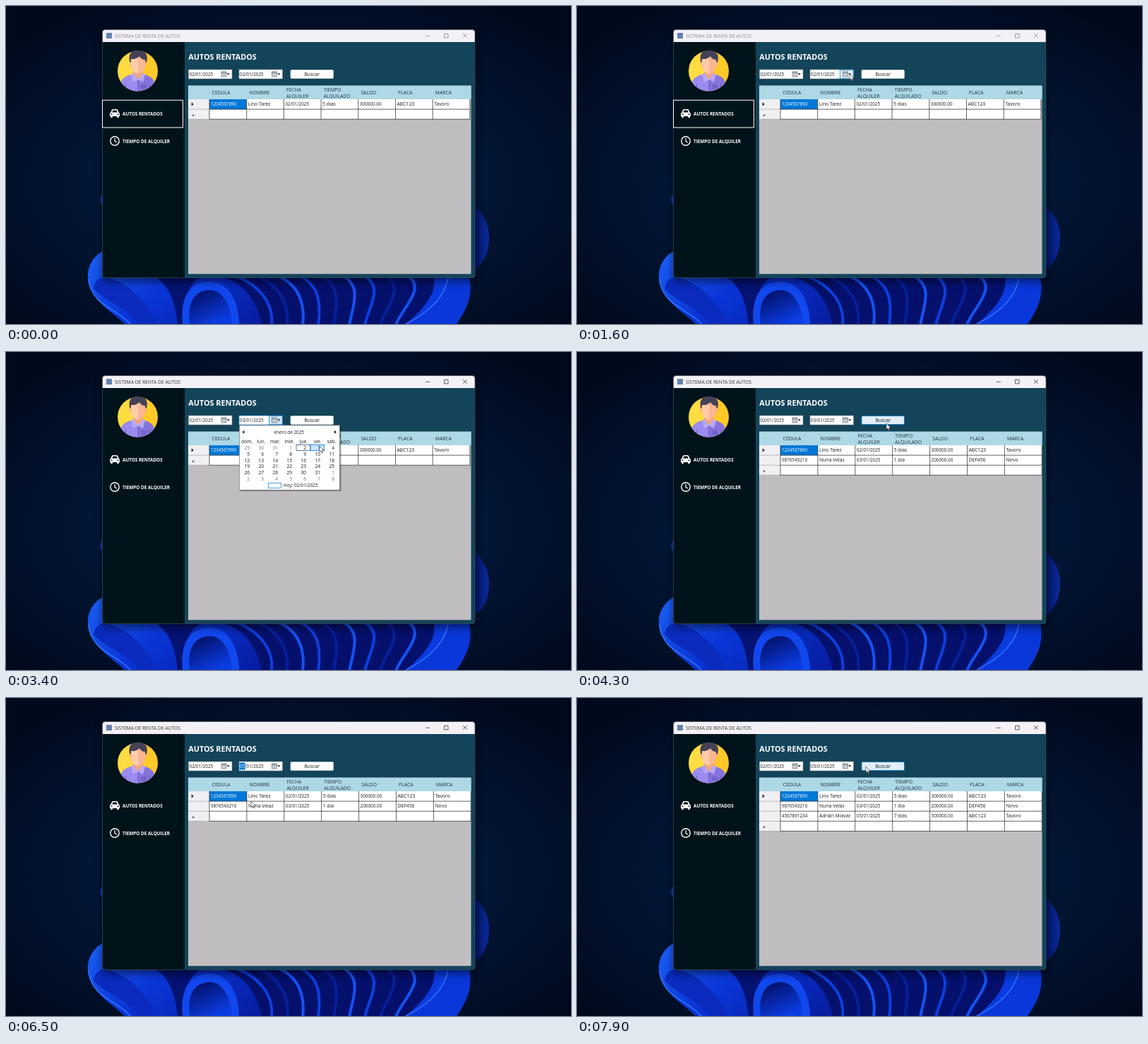
These frames come from a looping animation (800x450 px, 8000 ms). An HTML page:

```html
<!DOCTYPE html>
<html lang="es">
<head>
<meta charset="utf-8">
<title>Sistema de renta de autos</title>
<style>
html, body { margin: 0; width: 100%; height: 100%; overflow: hidden; background: #010a1f; }
svg { display: block; width: 100vw; height: 100vh; }
text { font: 6.8px "Open Sans", "Noto Sans", sans-serif; fill: #1c1c1c; white-space: pre; }
.num { font-size: 6.35px; }
.head { fill: #23333b; }
.title { font-size: 6.7px; fill: #333; }
.h1 { font-size: 10.8px; font-weight: 700; fill: #fff; }
.menu { font-size: 6.35px; font-weight: 700; fill: #fff; }
.mid { text-anchor: middle; }
.end { text-anchor: end; }
.dim { fill: #777; }
.light { fill: #fff; }
.controls { fill: none; stroke: #333; stroke-width: .8; }
.inactive .title { fill: #8b8a90; }
.inactive .controls { stroke: #8b8a90; }
.focusBox, .hot { visibility: hidden; }
.inactive .focusBox, .on { visibility: visible; }
</style>
</head>
<body>
<svg viewBox="0 0 800 450" preserveAspectRatio="none">
  <defs>
    <radialGradient id="night" cx=".5" cy=".55" r=".65">
      <stop offset="0" stop-color="#052455"/><stop offset=".55" stop-color="#021534"/><stop offset="1" stop-color="#010a1d"/>
    </radialGradient>
    <linearGradient id="petal" x2="1" y2=".25">
      <stop offset="0" stop-color="#1b62f8"/><stop offset=".3" stop-color="#0a35d6"/>
      <stop offset=".65" stop-color="#061da0"/><stop offset="1" stop-color="#0a3be0"/>
    </linearGradient>
    <linearGradient id="fold" x2=".6" y2="1">
      <stop offset="0" stop-color="#020b58"/><stop offset="1" stop-color="#0b3ce2"/>
    </linearGradient>
    <linearGradient id="side" x2="1">
      <stop offset="0" stop-color="#04115a"/><stop offset="1" stop-color="#0a2a9c"/>
    </linearGradient>
    <filter id="soft" x="-10%" y="-10%" width="120%" height="120%"><feGaussianBlur stdDeviation="6"/></filter>
    <clipPath id="disc"><circle cx="186.500" cy="92" r="28.500"/></clipPath>
    <clipPath id="frame"><rect x="136.500" y="33.500" width="527.500" height="351" rx="4"/></clipPath>
  </defs>

  <rect width="800" height="450" fill="url(#night)"/>
  <g id="bloom">
    <path d="M140 264C131 268 131 279 140 287Z" fill="#0d3aa8"/>
    <path d="M660 280C680 295 687 318 683 340C680 358 672 368 660 375Z" fill="url(#side)"/>
    <path d="M140 345C118 356 112 378 118 396C128 422 152 434 168 450H638C650 432 662 412 655 384L640 374Z" fill="url(#petal)"/>
    <path d="M140 384C160 386 196 408 212 450H186C176 428 142 420 124 400C126 388 132 384 140 384Z" fill="#0a2bbd"/>
    <path d="M212 384C234 398 240 424 243 450H262C254 420 252 398 276 384Z" fill="#041272"/>
    <path d="M250 450C246 410 262 390 288 390C318 390 330 424 330 450Z" fill="#1148ee"/>
    <path d="M260 450C256 418 268 402 289 402C309 402 319 428 320 450Z" fill="url(#fold)"/>
    <path d="M308 384C340 394 356 420 362 450H566C590 430 610 408 606 384Z" fill="#04106c"/>
    <g id="folds" fill="none" stroke-width="4"></g>
    <path d="M566 450C600 434 622 410 626 384H656C662 412 650 432 638 450Z" fill="#0a37d9"/>
    <path d="M117 386C120 424 158 428 176 450M566 450C602 432 622 410 626 384" fill="none" stroke="#3277ff" stroke-width="1.500"/>
  </g>

  <rect x="136" y="36" width="529" height="354" rx="5" opacity=".5" filter="url(#soft)"/>
  <g id="window" class="inactive">
    <g clip-path="url(#frame)">
      <rect x="136" y="33" width="529" height="352" fill="#134459"/>
      <rect x="136" y="51" width="117" height="334" fill="#00131b"/>
      <rect x="136" y="33" width="529" height="18" fill="#f3f1f6"/>
    </g>
    <rect x="136.500" y="33.500" width="527.500" height="351" rx="4" fill="none" stroke="#45515a" stroke-width=".6"/>
    <rect x="142" y="38" width="8" height="8" fill="#6482ad"/>
    <text class="title" x="154" y="44.600">SISTEMA DE RENTA DE AUTOS</text>
    <path class="controls" d="M594 42.200H600M620.500 39.300H626V44.800H620.500ZM647 39L652.800 44.800M652.800 39L647 44.800"/>

    <g clip-path="url(#disc)">
      <path d="M158 63H187V121H158Z" fill="#ffdc42"/>
      <path d="M186.500 63H216V121H186.500Z" fill="#ffc928"/>
      <path d="M162 122C161 104 166 100 178 97H196C207 100 212 104 211 122Z" fill="#8674dc"/>
      <path d="M162 122C161 104 166 100 178 97L186.500 104V122Z" fill="#9b8aef"/>
      <path d="M180 88H194V98L187 105L180 98Z" fill="#f2a481"/>
      <path d="M177 97L180 95L187 104L194 95L197 97L194 108L187 104L180 108Z" fill="#b5a8f7"/>
      <path d="M169.500 110V122M203.500 110V122M187 105V122" stroke="#6758b8" stroke-width=".8"/>
      <path d="M191 111H199V117H191Z" fill="#7463c8"/>
    </g>
    <path d="M176 82C171 66 180 62 188 63C200 63 202 72 198 83Z" fill="#454258"/>
    <path d="M177 75C182 76 186 74 189 71C191 75 194 76 197 76V84C197 91 191 96 187 96C183 96 177 91 177 84Z" fill="#f9b792"/>
    <path d="M177 75C181 76 185 74.500 187 73V96C183 96 177 91 177 84Z" fill="#ffcca9"/>
    <path d="M177 79C174 78 174 85 177.500 85ZM197 79C200 78 200 85 196.500 85Z" fill="#f5ad88"/>

    <rect class="focusBox" x="136.500" y="133.300" width="114" height="38.700" fill="none" stroke="#fff"/>
    <path d="M147 152L148.300 150.700L150 146.800Q150.500 146 151.500 146H156.500Q157.500 146 158 146.800L159.700 150.700L161 152V156H159.800V158H157.200V156H150.800V158H148.200V156H147Z" fill="#fff"/>
    <path d="M150.300 150.500L151.500 147.500H156.500L157.700 150.500ZM148.500 152.500H150.500V154H148.500ZM157.500 152.500H159.500V154H157.500Z" fill="#00131b"/>
    <circle cx="154" cy="191" r="6.200" fill="none" stroke="#fff" stroke-width="1.400"/>
    <path d="M154 187V191.300L156.800 193" fill="none" stroke="#fff" stroke-width="1.200"/>
    <text class="menu" x="165" y="155.400">AUTOS RENTADOS</text>
    <text class="menu" x="165" y="194.400">TIEMPO DE ALQUILER</text>
    <text class="h1" x="258.300" y="76.200">AUTOS RENTADOS</text>

    <g id="pickers"></g>
    <rect id="button" x="403" y="90.500" width="60.500" height="12" rx="1.500" stroke-width=".8"/>
    <text class="mid" x="433.200" y="98.900">Buscar</text>

    <rect x="258" y="112.700" width="400.500" height="266.500" fill="#bfbdbf"/>
    <g id="grid"></g>
    <g id="calendar" class="hot"></g>
  </g>
  <path id="cursor" d="M0 0V8.600L2 6.800L3.500 10L4.900 9.400L3.500 6.300H6.200Z" fill="#fff" stroke="#222" stroke-width=".6"/>
</svg>

<script>
const LOOP = 8000;
const $ = id => document.getElementById(id);
const rect = (x, y, w, h, fill, extra = '') =>
  `<rect x="${x}" y="${y}" width="${w}" height="${h}" fill="${fill}" ${extra}/>`;
const text = (x, y, s, cls = '') => `<text x="${x}" y="${y}" class="${cls}">${s}</text>`;
const line = (x1, y1, x2, y2, color, width = .7) =>
  `<path d="M${x1} ${y1}L${x2} ${y2}" stroke="${color}" stroke-width="${width}"/>`;

const COLUMNS = ['CEDULA', 'NOMBRE', 'FECHA ALQUILER', 'TIEMPO ALQUILADO', 'SALDO', 'PLACA', 'MARCA'];
const RENTALS = [
  ['1234567890', 'Lino Tarez', '02/01/2025', '5 días', '300000.00', 'ABC123', 'Tavoro'],
  ['9876543210', 'Nuria Velaz', '03/01/2025', '1 día', '200000.00', 'DEF456', 'Nirvo'],
  ['4567891234', 'Adrián Molvar', '05/01/2025', '7 días', '500000.00', 'ABC123', 'Tavoro']
];

// Pointer stops: time, x, y
const PATH = [
  [900, 600, 450], [1500, 386, 96], [1950, 386, 96], [2800, 441, 134], [3400, 444, 133],
  [3950, 438, 99], [4300, 438, 101], [4900, 386, 97], [5100, 386, 97], [5400, 397, 126],
  [6050, 345, 145], [6500, 347, 146], [7300, 412, 97], [7900, 409, 97]
];

function drawFolds() {
  let out = '';
  for (let i = 0; i < 9; i++) {
    const x = 318 + i * 31;
    const end = 376 + i * 22;
    const color = ['#0c3fe0', '#071f9c', '#1552f2'][i % 3];
    out += `<path d="M${x} 380C${x + 34} ${390 + i} ${end + 4} ${416 + i * 2} ${end} 452" stroke="${color}"/>`;
  }
  $('folds').innerHTML = out;
}

function picker(x, date, { hover, open, selected }) {
  let out = rect(x, 90, 61.5, 13, '#fff', `stroke="${open ? '#0078d7' : '#8a8a8a'}" stroke-width=".6"`);
  if (hover || open) {
    out += rect(x + 42.5, 90.3, 18.7, 12.4, open ? '#cce4f7' : '#e5f1fb', 'stroke="#0078d7" stroke-width=".7"');
  }
  if (selected) {
    out += rect(x + .6, 91.5, 8, 10, '#0078d7');
    out += `<text class="num" x="${x + 1}" y="98.800"><tspan class="light">${date.slice(0, 2)}</tspan>${date.slice(2)}</text>`;
  } else {
    out += text(x + 1, 98.8, date, 'num');
  }
  out += rect(x + 46.5, 92.8, 7, 7.2, '#d9dde2', 'stroke="#66707a" stroke-width=".7"');
  out += line(x + 46.5, 94.6, x + 53.5, 94.6, '#66707a', 1);
  for (const y of [96.5, 98.3]) out += line(x + 47.5, y, x + 52.5, y, '#8e98a2', .5);
  return out + `<path d="M${x + 54.3} 95.300h4l-2 2.400z" fill="#222"/>`;
}

function grid(count) {
  const step = count > 1 ? 52.9 : 52.7;
  const rowH = 14.1, top = 132, left = 288;
  const right = left + step * 7, bottom = top + rowH * (count + 1);
  let out = rect(258, 112.7, 400.5, 19.3, '#add8e6');
  out += rect(258, top, 30, bottom - top, '#f0eff1');
  out += rect(left, top, right - left, bottom - top, '#fff');
  out += rect(left, top, step, rowH, '#0078d7');
  COLUMNS.forEach((name, i) => {
    const x = left + 3.6 + i * step;
    const words = name.split(' ');
    if (words.length > 1) words.forEach((w, k) => out += text(x, 120.8 + k * 8.7, w, 'head'));
    else out += text(x, 125.2, name, 'head');
  });
  for (let r = 0; r < count; r++) {
    RENTALS[r].forEach((value, i) => {
      const cls = (/^\d/.test(value) && !value.includes('d') ? 'num ' : '') + (r + i ? '' : 'light');
      out += text(left + 2 + i * step, top + 9.2 + r * rowH, value, cls);
    });
  }
  for (let r = 1; r <= count + 1; r++) {
    const y = top + r * rowH;
    out += line(258, y, left, y, '#a5a3a6') + line(left, y, right, y, '#202020');
  }
  for (let i = 0; i <= 7; i++) out += line(left + i * step, top, left + i * step, bottom, '#202020');
  out += '<path d="M262.700 136.200L265.700 138.900L262.700 141.600Z" fill="#222"/>';
  return out + text(263.3, bottom - 2.7, '*');
}

function calendar(day) {
  const colX = i => 341 + i * 20;
  let out = rect(332, 106, 142.5, 91, '#000', 'opacity=".35"');
  out += rect(330.5, 103.8, 142, 91.4, '#fff', 'stroke="#777" stroke-width=".7"');
  out += text(400.7, 115.8, 'enero de 2025', 'num mid');
  out += '<path d="M337.500 110.800v5l-3-2.500zM465 110.800v5l3-2.500z" fill="#222"/>';
  ['dom.', 'lun.', 'mar.', 'mié.', 'jue.', 'vie.', 'sáb.'].forEach((name, i) =>
    out += text(colX(i) + .3, 128.8, name, 'mid'));
  out += line(334, 130.4, 469, 130.4, '#ddd', .5);
  const box = d => {
    const cell = d + 2, x = 331 + cell % 7 * 20, y = 131.3 + Math.floor(cell / 7) * 8.8;
    return [x, y, 19.8, 8.3];
  };
  out += rect(...box(day), '#cce8ff', 'stroke="#0078d7" stroke-width=".8"');
  out += rect(...box(2), 'none', 'stroke="#3b5f80" stroke-width=".8"');
  for (let n = 0; n < 42; n++) {
    const d = n - 2;
    const label = d < 1 ? d + 31 : d > 31 ? d - 31 : d;
    out += text(colX(n % 7) + 4.2, 137.9 + Math.floor(n / 7) * 8.85, label, d < 2 || d > 31 ? 'end dim' : 'end');
  }
  out += rect(371.3, 185.3, 18, 7, '#fff', 'stroke="#0078d7" stroke-width=".7"');
  return out + text(393, 191.3, 'Hoy: 02/01/2025', 'num');
}

function pointerAt(t) {
  if (t < PATH[0][0]) return null;
  const next = PATH.findIndex(p => p[0] > t);
  if (next < 0) return PATH[PATH.length - 1].slice(1);
  const [t0, x0, y0] = PATH[next - 1], [t1, x1, y1] = PATH[next];
  const u = (t - t0) / (t1 - t0), k = u * u * (3 - 2 * u);
  return [x0 + (x1 - x0) * k, y0 + (y1 - y0) * k];
}

const cache = {};
function update(id, key, make) {
  if (cache[id] === key) return;
  cache[id] = key;
  $(id).innerHTML = make();
}

function render(t) {
  const pos = pointerAt(t);
  const over = (x0, x1) => !!pos && pos[0] >= x0 && pos[0] <= x1 && pos[1] >= 90 && pos[1] <= 103;
  const between = (a, b) => t >= a && t < b;

  const day = t < 3200 ? 2 : t < 6200 ? 3 : 5;
  const open = between(1800, 3500) || between(5000, 6300);
  const selected = between(3500, 4100) || between(6300, 7600);
  const count = t < 4100 ? 1 : t < 7600 ? 2 : 3;
  const hover = over(372, 391.5);
  const hot = over(403, 464);

  $('window').classList.toggle('inactive', t < 1800);
  $('calendar').classList.toggle('on', open);
  update('pickers', [day, open, selected, hover].join(), () =>
    picker(258.5, '02/01/2025', {}) + picker(330, `0${day}/01/2025`, { hover, open, selected }));
  update('grid', count, () => grid(count));
  update('calendar', day, () => calendar(day));
  $('button').setAttribute('fill', hot ? '#e0eefa' : '#fdfdfd');
  $('button').setAttribute('stroke', hot ? '#0078d7' : '#d0d0d0');
  $('cursor').setAttribute('visibility', pos ? 'visible' : 'hidden');
  if (pos) $('cursor').setAttribute('transform', `translate(${pos})`);
}

drawFolds();
const start = performance.now();
function tick() {
  render((performance.now() - start) % LOOP);
  requestAnimationFrame(tick);
}
tick();
</script>
</body>
</html>
```
